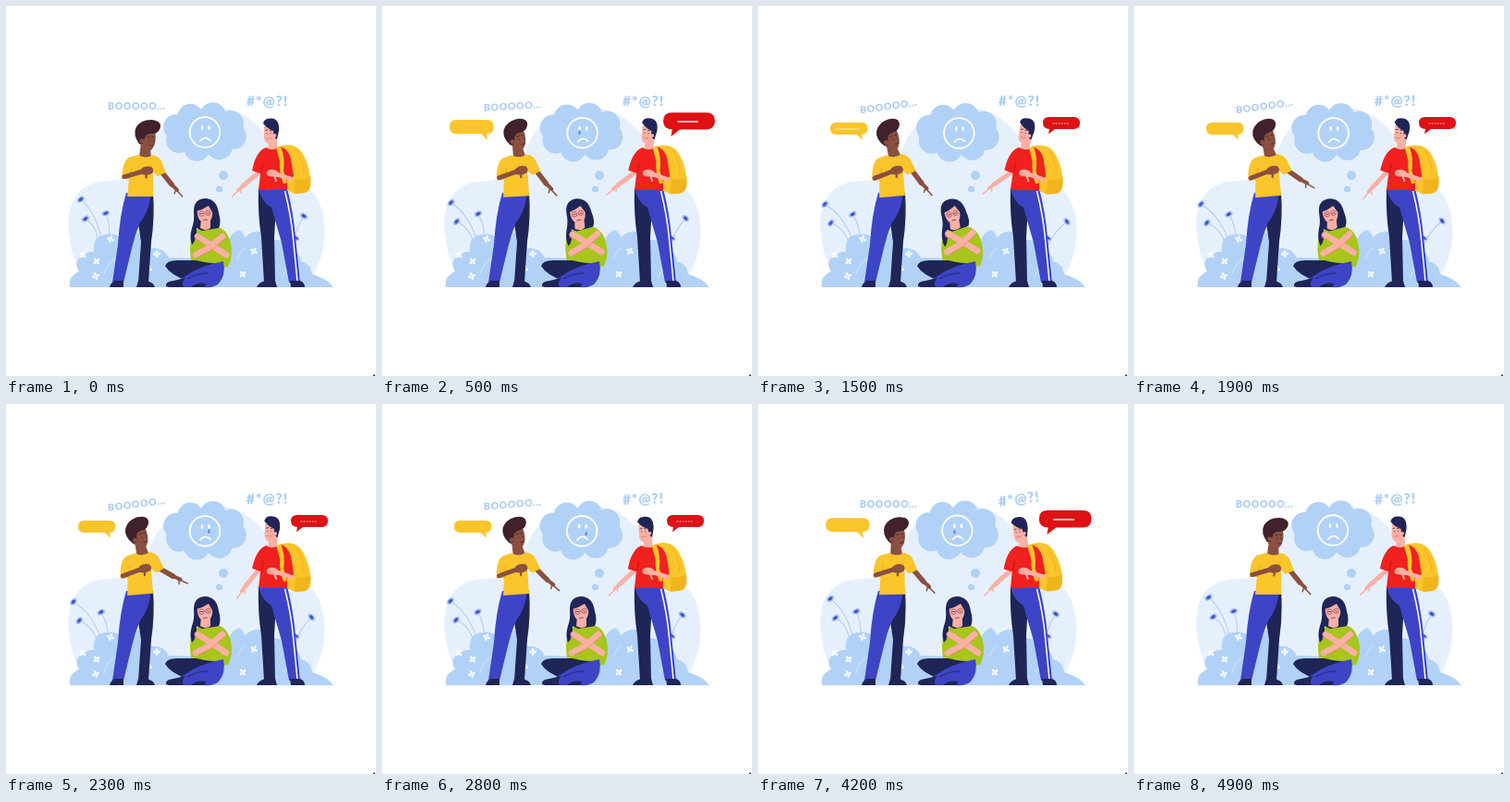
An HTML page for the animation above (5 s loop, 400 px wide and 400 px high).

```html
<!DOCTYPE html>
<html lang="en">
<head>
<meta charset="utf-8">
<title>Bullying scene</title>
<style>
html, body { margin: 0; width: 100%; height: 100%; overflow: hidden; background: #fff; }
svg { display: block; width: 100%; height: 100%; }
text { font-family: Lato, "Open Sans", sans-serif; font-weight: 900; fill: #aecdf5; }
.pale { fill: #e6f0fd; }
.sky { fill: #b1d2f6; }
.stem { fill: none; stroke: #b1cdf3; stroke-width: 1.1; }
.blue { fill: #3d44c6; }
.navy { fill: #1f2557; }
.gold { fill: #fac42b; }
.red { fill: #f0211f; }
.lime { fill: #a7c51b; }
.brown { fill: #8a5040; }
.skin { fill: #fbb0a4; }
.limb { fill: none; stroke-linecap: round; stroke-linejoin: round; }
.brown.limb { fill: none; stroke: #8a5040; }
.skin.limb { fill: none; stroke: #fbb0a4; }
.ink { fill: none; stroke: #1f2557; stroke-width: .7; stroke-linecap: round; }
.chalk { fill: none; stroke: #fff; stroke-width: 1.8; stroke-linecap: round; }
</style>
</head>
<body>
<svg viewBox="0 0 400 400" xmlns="http://www.w3.org/2000/svg">
  <defs>
    <g id="blossom" fill="#fff">
      <ellipse cy="-2.3" rx="1.3" ry="1.8"/><ellipse cy="2.3" rx="1.3" ry="1.8"/>
      <ellipse cx="-2.3" rx="1.8" ry="1.3"/><ellipse cx="2.3" rx="1.8" ry="1.3"/>
    </g>
    <g id="bloom">
      <ellipse rx="4.600" ry="2.900" fill="#a9c4f4"/><ellipse rx="2.700" ry="1.700" fill="#4058c8"/>
    </g>
  </defs>

  <path class="pale" d="M69 252C62 214 78 189 112 189C150 188 150 162 160 146C172 120 200 110 230 110C262 112 284 138 296 165C306 192 340 188 344 234C346 264 338 282 328 298L92 298Q72 284 69 252Z"/>

  <g id="stemA"><path class="stem" d="M104 257Q99 225 82 210"/><use href="#bloom" transform="translate(81 209) rotate(-35)"/></g>
  <g id="stemB"><path class="stem" d="M101 262Q99 238 87 231"/><use href="#bloom" transform="translate(86 230) rotate(-35)"/></g>
  <g id="stemC"><path class="stem" d="M111 254Q113 234 108 225"/><use href="#bloom" transform="translate(108 224) rotate(-20)"/></g>
  <g id="stemD"><path class="stem" d="M310 266Q312 240 322 228"/><use href="#bloom" transform="translate(322 227) rotate(35)"/></g>
  <path class="stem" d="M309 272Q309 258 314 252"/>
  <use href="#bloom" transform="translate(314 251) rotate(35) scale(.8)"/>

  <path class="sky" d="M69 304Q67 292 79 287Q72 276 84 269Q90 265 95 266Q93 249 107 247Q118 245 125 251Q132 238 145 246Q156 252 156 262Q170 260 176 272L246 274Q245 264 254 262Q256 247 269 244Q281 242 287 254Q300 250 306 264Q317 264 319 276Q329 278 331 290Q346 294 354 304Z"/>
  <path class="sky" d="M236 276Q238 246 252 242Q261 247 258 262L256 290Z"/>
  <path fill="none" stroke="#d5e5fc" d="M250 274Q252 266 258 262M106 290Q110 276 121 272M300 292Q303 280 312 276"/>
  <g id="blossoms"></g>

  <g id="cloud"><ellipse class="sky" cx="215" cy="136" rx="34" ry="22"/></g>
  <g id="mood">
    <circle class="chalk" cx="215" cy="136.500" r="16.300"/>
    <ellipse cx="212" cy="131.500" rx="1.300" ry="2.500" fill="#fff"/>
    <ellipse cx="219.500" cy="131.500" rx="1.300" ry="2.500" fill="#fff"/>
    <path class="chalk" d="M210 146Q215.500 139.500 221 145.500"/>
    <path id="tear" d="M0 -3q-2.600 4 0 5.200q2.600-1.200 0-5.200z" fill="#5f8be0"/>
  </g>
  <circle class="sky" cx="235" cy="183" r="5"/>
  <circle class="sky" cx="230.500" cy="198" r="3.500"/>

  <text id="boo" x="110" y="112" font-size="10.500" letter-spacing=".6">BOOOOO...</text>
  <text id="curse" x="260" y="108" font-size="15.500" letter-spacing=".9">#*@?!</text>

  <g id="sayL">
    <path class="gold" d="M84.500 126H112Q118.500 126 118.500 132.500Q118.500 139 112 139L113 145L107 139H84.500Q78 139 78 132.500Q78 126 84.500 126Z"/>
    <path id="dotsL" class="limb" d="M84 133H109" stroke="#fff0b8" stroke-width="1.300" stroke-dasharray="1 2"/>
  </g>
  <g id="sayR">
    <path fill="#de1114" d="M314.500 120H341.500Q348 120 348 126.500Q348 133 341.500 133H321L314 138.500L315 133Q308 133 308 126.500Q308 120 314.500 120Z"/>
    <path id="dotsR" class="limb" d="M319 127H336" stroke="#ffb9b4" stroke-width="1.100" stroke-dasharray="1 2"/>
    <path id="barR" d="M319 127H335" stroke="#ffd9d2" stroke-width="1.200"/>
  </g>

  <!-- boy on the left -->
  <path class="navy" d="M143 202H159Q161 228 157 255L154 299H143L146 255L141 222Z"/>
  <path class="blue" d="M130 202H157Q155 222 145 234Q139 248 136 262L127 299H115L121 258Q123 225 130 202Z"/>
  <path class="navy" d="M112 304Q113 299 118 297H127L127 304ZM141 304L143 297H152Q160 299 161 304Z"/>
  <g id="bodyL">
    <g id="pointL">
      <path class="brown limb" d="M168 179L179 193" stroke-width="5.500"/>
      <path class="brown limb" d="M179 193L185 199" stroke-width="4"/>
      <path class="brown limb" d="M184 199L190.500 206M183 200L182 203" stroke-width="1.500"/>
    </g>
    <g id="headL">
      <path class="brown" d="M146 150L156 152L157 164Q150 167 144 163Z"/>
      <path class="brown" d="M144 138Q146 131 154 131Q162 132 162 141Q162 153 155 157Q146 156 144 146Z"/>
      <path fill="#40212c" d="M144 149Q137 139 141 131Q146 123 157 123Q169 124 167 132Q164 139 157 138Q151 138 150 143L148 149Z"/>
      <circle class="brown" cx="147" cy="146" r="2.500"/>
      <path d="M153 142l2.500-.7M158 141.500l2 .4M155 145v.5M159.500 145v.5M156 151q2 1 3.500-.5" fill="none" stroke="#40212c" stroke-width=".8" stroke-linecap="round"/>
    </g>
    <path class="gold" d="M143 161Q151 166 159 161Q167 163 169 170L173 180L164 184L159 179L159 206H131L133 187L125 187Q126 165 135 163Z"/>
    <path d="M133 187Q136 180 136 174M159 179L157 172" fill="none" stroke="#e8a912" stroke-width=".9"/>
    <path class="brown limb" d="M128 184.500L149 178.500" stroke-width="5"/>
    <path class="brown" d="M146 176Q151 172 157 174Q161 177 158 181Q153 184 147 182Z"/>
    <path class="brown limb" d="M152 180L151.500 185.500" stroke-width="2.200"/>
  </g>

  <!-- boy on the right -->
  <path class="navy" d="M273 197H293L290 250L291 299H279L276 250Q272 225 273 197Z"/>
  <path class="blue" d="M273 197H304Q311 225 313 250L318 299H306L298 256L287 218Q276 212 273 197Z"/>
  <path d="M301.500 200Q308.500 228 310.500 252L315 298" fill="none" stroke="#fff" stroke-width="1.500"/>
  <path class="navy" d="M271 304Q273 299 280 297H291L293 304ZM308 304L307 297H318Q323 299 323 304Z"/>
  <g id="bodyR">
    <path class="gold" d="M294 152Q313 146 321 160Q330 176 329 193Q327 203 312 203L303 199Z"/>
    <path fill="#f0b41c" d="M313 187Q324 189 329 184Q331 200 323 202L312 203Z"/>
    <path d="M314 156Q322 168 322 182" fill="none" stroke="#f0b41c"/>
    <g id="pointR">
      <path class="skin limb" d="M272 181L256 194.500" stroke-width="5"/>
      <path class="skin limb" d="M256 194.500L251 199" stroke-width="3.800"/>
      <path class="skin limb" d="M251 199.500L244.500 206M254 199L254 202" stroke-width="1.400"/>
    </g>
    <g id="headR">
      <path class="skin" d="M284 146L293 142V154Q289 159 283 154Z"/>
      <path class="skin" d="M279 130Q286 126 293 132Q294 145 287 149Q280 150 279 143Z"/>
      <path class="navy" d="M278 127Q279 121 287 121.500Q296 122 295 135L293 144Q289 143 289 135Q283 133 278 127Z"/>
      <circle class="skin" cx="290.500" cy="140" r="1.900"/>
      <path class="ink" d="M280.500 134.500l2-.6M285 134.500l2 .3M282 137.500v.4M286 137.500v.4"/>
      <path d="M281.500 143q2.500 2.500 5-.3z" fill="#fff" stroke="#d4625a" stroke-width=".6"/>
    </g>
    <path class="red" d="M281 153Q289 158 296 152Q305 154 308 165L311 184L304 188V199H273L275 181L266 178Q270 157 281 153Z"/>
    <path class="gold" d="M292 153L297 152Q302 164 300 178L304 191L300 192Q295 180 296 168Z"/>
    <path d="M276 180L278 170" fill="none" stroke="#b81520" stroke-width=".9"/>
    <path class="skin limb" d="M308 187L290 181" stroke-width="4.800"/>
    <path class="skin" d="M294 179Q288 175 283 178Q280 182 284 184L294 185Z"/>
    <path class="skin limb" d="M290 183L292 189" stroke-width="2.100"/>
    <path d="M283 180.500l5 .2M284 183l4 0" stroke="#e98379" stroke-width=".6"/>
  </g>

  <!-- seated girl -->
  <g id="girl">
    <path class="lime" d="M207 241Q215 237 229 239Q240 242 243 257Q246 270 240 282Q218 286 201 279Q197 262 201 249Z"/>
    <g id="hair">
      <path class="navy" d="M203 222Q203 208 216 208Q228 209 230 224Q233 234 230 240L212 243L206 240Q207 252 201 258Q198 250 201 240Q204 232 203 222Z"/>
      <path class="skin" d="M211 230H221V240Q216 244 210 240Z"/>
      <path class="skin" d="M207 218Q214 212 222 216Q225 226 221 232Q214 237 209 231Q206 226 207 218Z"/>
      <path class="navy" d="M205 222Q206 211 217 211Q227 213 226 227Q222 222 219 216Q213 220 205 222Z"/>
      <g fill="none" stroke="#8a4a70" stroke-width=".7"><circle cx="211.500" cy="224.500" r="2.700"/><circle cx="218.500" cy="223.800" r="2.700"/></g>
      <path class="ink" d="M210.500 224.500h2M217.500 224h2M213.500 231.500q2-1.500 4-.3"/>
    </g>
    <g id="arms">
      <path class="skin limb" d="M238 269L223 259L207 249" stroke-width="6.500"/>
      <path class="skin limb" d="M205 269L220 261L234 249" stroke-width="6.500"/>
      <path d="M208 271.500L222 264L236 252M204 252L211 255M229 247.500L233 244" fill="none" stroke="#ef857c" stroke-width=".9" stroke-linecap="round"/>
    </g>
  </g>
  <path class="navy" d="M172 281Q174 274 188 275L206 275Q222 279 235 278L214 293L196 297Q178 291 172 281Z"/>
  <path class="blue" d="M235 276Q238 291 230 300Q225 305 214 304H188Q183 298 192 293Q209 281 235 276Z"/>
  <path class="navy" d="M173 303Q172 298 181 297L194 294Q189 299 192 304H176ZM200 304Q206 298 216 300L215 304Z"/>
  <path d="M196 295Q208 288 219 289" fill="none" stroke="#1f2557" stroke-width=".8"/>

  <rect x="397" y="398.600" width="2" height="1.400" fill="#333"/>
</svg>
<script>
const LOOP = 5000;
const { sin, cos, PI, min, max, floor } = Math;
const $ = id => document.getElementById(id);

function add(parent, tag, attrs) {
  const el = document.createElementNS("http://www.w3.org/2000/svg", tag);
  for (const k in attrs) el.setAttribute(k, attrs[k]);
  $(parent).append(el);
}

const LOBES = 8;
for (let i = 0; i < LOBES; i++) {
  const a = (i + .35) / LOBES * 2 * PI;
  add("cloud", "circle", { class: "sky", cx: 215 + 32 * cos(a), cy: 136 + 18.5 * sin(a), r: 14 });
}

const spots = [[113, 252], [83, 269], [98, 276], [97, 292], [163, 268], [154, 284], [268, 265], [256, 290]];
spots.forEach(([x, y], i) =>
  add("blossoms", "use", { href: "#blossom", transform: `translate(${x} ${y}) rotate(${20 + i * 17})` }));

// Motion curves; p runs from 0 to 1 over the loop.
const bump = (p, end = 1, skew = 1) => p < end ? sin(PI * (p / end) ** skew) : 0;
const lean = p => bump(p, 1, .6);
const wave = p => sin(2 * PI * p);
const jab = p => lean(p) * cos(4 * PI * (p - .2));
const drift = p => lean(p) + jab(p);

function backOut(u, s) {
  const v = max(0, min(1, u)) - 1;
  return 1 + (s + 1) * v ** 3 + s * v ** 2;
}
const pop = (p, s) => max(0, backOut((p - .02) / .15, s) * backOut((.934 - p) / .2, s));

// Each joint: pivot x, pivot y, angle over the loop.
const joints = {
  bodyL: [145, 205, p => -5 * lean(p)],
  headL: [150, 160, p => -14 * lean(p)],
  pointL: [168, 181, p => 19 * jab(p)],
  bodyR: [290, 200, p => 1.3 * wave(p)],
  headR: [289, 152, p => 8 * wave(p)],
  pointR: [271, 181, p => 12 * jab(p)],
  girl: [220, 282, p => -3 * bump(p, .46)],
  hair: [215, 242, p => -8 * bump(p, .46)],
  stemA: [104, 257, p => -11 * lean(p)],
  stemB: [101, 262, p => -14 * lean(p)],
  stemC: [111, 254, p => -11 * lean(p)],
  stemD: [310, 266, p => 19 * bump(p, .6)],
  boo: [141, 109, p => -8 * bump(p, .7)],
  curse: [283, 104, p => -8 * bump(p, 1, 4)],
};

const put = (id, value) => $(id).setAttribute("transform", value);
const show = (id, on) => $(id).setAttribute("opacity", on ? 1 : 0);
const scaleAt = (id, x, y, s) => put(id, `translate(${x} ${y}) scale(${s}) translate(${-x} ${-y})`);

function draw(p) {
  for (const id in joints) {
    const [x, y, angle] = joints[id];
    put(id, `rotate(${angle(p)} ${x} ${y})`);
  }
  put("arms", `translate(0 ${-4 * bump(p, .46)})`);
  put("cloud", `translate(${.6 * drift(p)} ${.8 * lean(p)})`);
  put("mood", `translate(${1.8 * drift(p)} ${lean(p)})`);

  scaleAt("sayL", 106, 143, pop(p, 2.4));
  scaleAt("sayR", 318, 132, pop(p, 4.3));
  const solid = p < .26 || p > .76;
  show("dotsL", p > .24 && p < .38);
  show("dotsR", !solid);
  show("barR", solid);

  // Three tears a loop, left and right in turn.
  const drop = floor(3 * p), fall = 3 * p - drop;
  put("tear", `translate(${drop % 2 ? 219.5 : 212} ${133 + 10 * fall})`);
  show("tear", fall > .15 && fall < .8);
}

function tick() {
  draw(performance.now() % LOOP / LOOP);
  requestAnimationFrame(tick);
}
draw(0);
requestAnimationFrame(tick);
</script>
</body>
</html>
```
